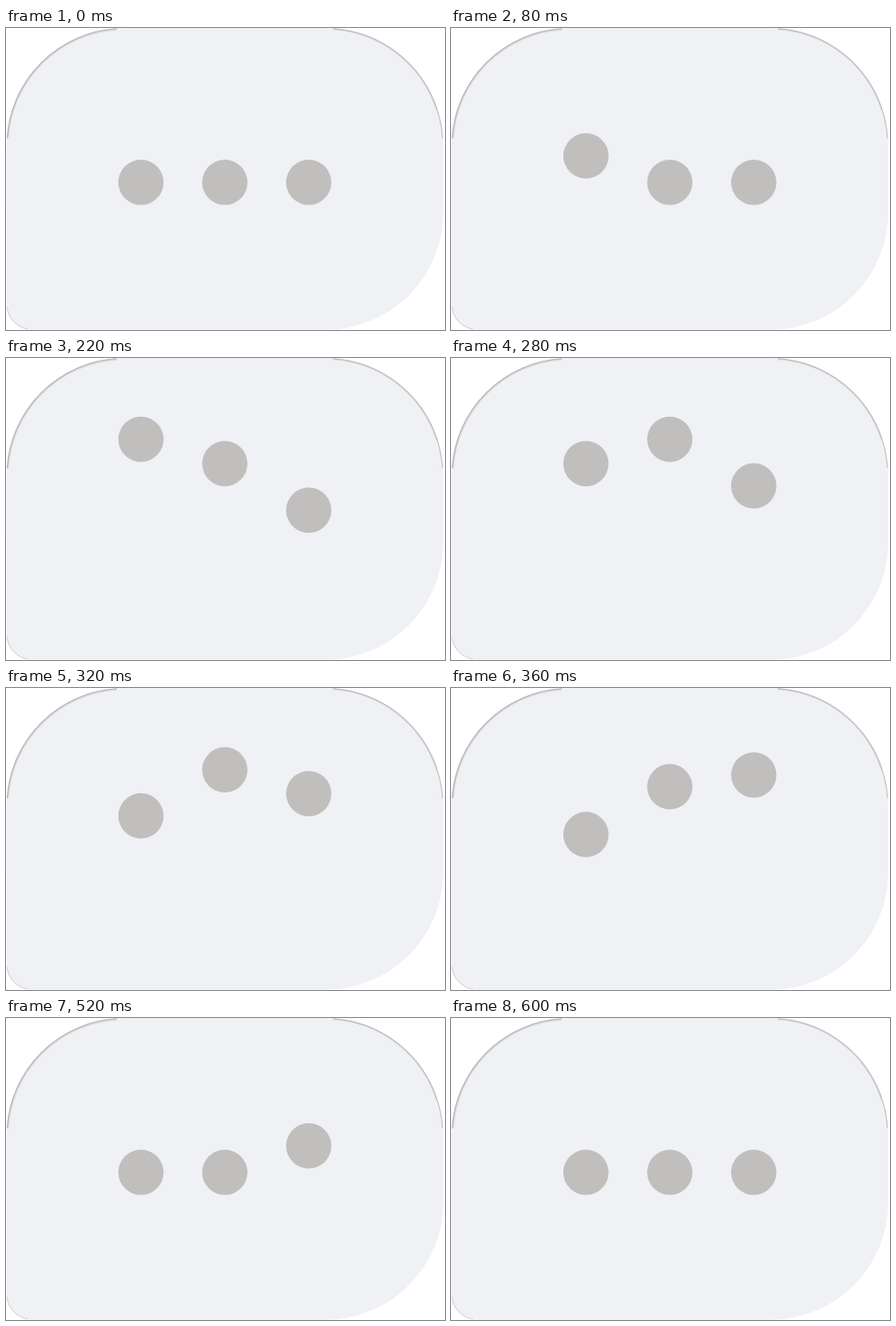
Animation, 500 px wide and 344 px high, one loop 900 ms. Source, as an HTML page with a canvas:

```html
<!DOCTYPE html>
<html lang="en">
<head>
<meta charset="utf-8">
<title>Typing indicator</title>
<style>
html, body { margin: 0; width: 100%; height: 100%; overflow: hidden; background: #fff; }
canvas { display: block; }
</style>
</head>
<body>
<canvas id="stage" width="500" height="344"></canvas>
<script>
const ctx = document.getElementById('stage').getContext('2d');

const LOOP = 900, STEP = 20;
const REST_Y = 175.8, LIFT = 85.6, RADIUS = 25.8;
const BUBBLE = { left: 0.6, top: 0, right: 498, bottom: 343.8, round: 134, tail: 29 };
const DOTS = [
  { x: 153.7, start: 0, peak: 200, end: 400 },
  { x: 249.2, start: 100, peak: 300, end: 480 },
  { x: 344.8, start: 200, peak: 400, end: 600 }
];

function smooth(p) {
  p = Math.min(1, Math.max(0, p));
  return p * p * (3 - 2 * p);
}

function dotY({ start, peak, end }, t) {
  const p = t < peak ? (t - start) / (peak - start) : (end - t) / (end - peak);
  return REST_Y - LIFT * smooth(p);
}

// Shaded rim inside a rounded corner; angles are in half turns.
function rim(x, y, r, from, to, depth, color) {
  ctx.beginPath();
  ctx.arc(x, y, r - depth / 2, from * Math.PI, to * Math.PI);
  ctx.lineWidth = depth;
  ctx.strokeStyle = color;
  ctx.stroke();
}

function drawBubble() {
  const { left, top, right, bottom, round, tail } = BUBBLE;
  const leftX = left + round, rightX = right - round, y = top + round;
  ctx.beginPath();
  ctx.roundRect(left, top, right - left, bottom - top, [round, round, round, tail]);
  ctx.fillStyle = '#f0f1f5';
  ctx.fill();
  rim(leftX, y, round, 1.02, 1.48, 2.4, '#dadadc');
  rim(leftX, y, round, 1.02, 1.48, 1.1, '#b4b4b4');
  rim(rightX, y, round, 1.52, 1.9, 2, '#dadadc');
  rim(rightX, y, round, 1.52, 1.98, 1, '#b8b8b8');
  rim(left + tail, bottom - tail, tail, 0.55, 0.97, 0.8, '#c4c4c6');
}

function draw(t) {
  ctx.clearRect(0, 0, 500, 344);
  drawBubble();
  ctx.fillStyle = '#c0bfbd';
  for (const dot of DOTS) {
    ctx.beginPath();
    ctx.arc(dot.x, dotY(dot, t), RADIUS, 0, Math.PI * 2);
    ctx.fill();
  }
}

let origin = null;
function tick(now) {
  origin ??= now;
  const t = (now - origin) % LOOP;
  draw(Math.floor(t / STEP + 1e-6) * STEP);
  requestAnimationFrame(tick);
}

draw(0);
requestAnimationFrame(tick);
</script>
</body>
</html>
```
